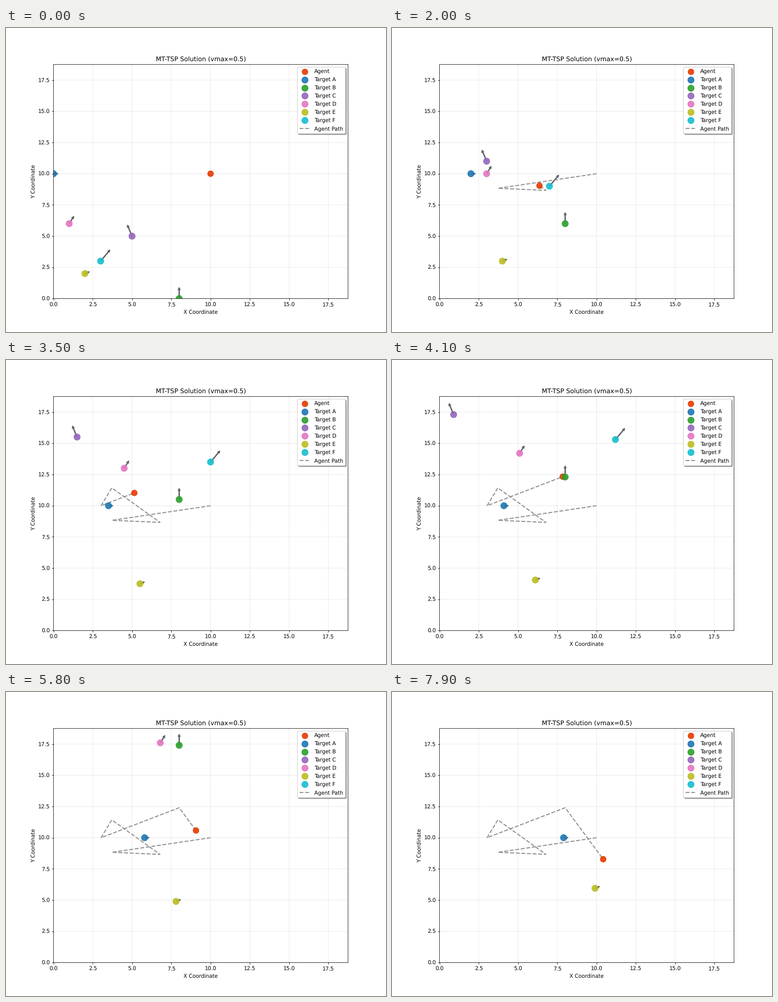
Recreate the animation shown at these times as a matplotlib script. Size 837 by 669 pixels, loop 8 s.

```python
import numpy as np
import matplotlib.pyplot as plt
from matplotlib.animation import FuncAnimation

# Soft, sub-pixel drawing of lines and text
plt.rcParams.update({"path.snap": False, "text.hinting": "none"})

FRAMES, STEP_MS = 80, 100
VMAX = 0.5
LIMIT = 18.75
ARROW_SCALE = 3
AGENT_COLOR, AGENT_SIZE, TARGET_SIZE = "#e63900", 11, 12

# name: (start, velocity per step, colour)
TARGETS = {
    "A": ((0, 10), (0.1, 0), "tab:blue"),
    "B": ((8, 0), (0, 0.3), "tab:green"),
    "C": ((5, 5), (-0.1, 0.3), "tab:purple"),
    "D": ((1, 6), (0.1, 0.2), "tab:pink"),
    "E": ((2, 2), (0.1, 0.05), "tab:olive"),
    "F": ((3, 3), (0.2, 0.3), "tab:cyan"),
}
START = np.array([10.0, 10.0])
TOUR = "CFDAB"
FINAL, FINAL_TIME = "E", 93.6

names = list(TARGETS)
starts = np.array([s for s, _, _ in TARGETS.values()], float)
vels = np.array([v for _, v, _ in TARGETS.values()])
colors = [c for _, _, c in TARGETS.values()]


def target_pos(name, t):
    i = names.index(name)
    return starts[i] + vels[i] * t


def intercept_time(pos, t, name):
    """Earliest time an agent at full speed can meet the target."""
    gap = target_pos(name, t) - pos
    vel = vels[names.index(name)]
    a = VMAX**2 - vel @ vel
    b = gap @ vel
    return t + (b + np.sqrt(b * b + a * (gap @ gap))) / a


def plan_route():
    times, points = [0.0], [START]
    for name in TOUR:
        times.append(intercept_time(points[-1], times[-1], name))
        points.append(target_pos(name, times[-1]))
    times.append(FINAL_TIME)
    points.append(target_pos(FINAL, FINAL_TIME))
    return np.array(times), np.array(points)


times, points = plan_route()

fig, ax = plt.subplots(figsize=(10.0001, 7.993), dpi=83.7)
ax.set(xlim=(0, LIMIT), ylim=(0, LIMIT),
       xlabel="X Coordinate", ylabel="Y Coordinate",
       title=f"MT-TSP Solution (vmax={VMAX})")
ax.grid(True, alpha=0.3)


def legend_dot(color, size, label):
    ax.plot([], [], "o", color=color, ms=size, alpha=0.9, label=label)


legend_dot(AGENT_COLOR, AGENT_SIZE, "Agent")
for name, color in zip(names, colors):
    legend_dot(color, TARGET_SIZE, f"Target {name}")
path, = ax.plot([], [], "--", color="gray", lw=2, alpha=0.85, zorder=1.5,
                label="Agent Path")

dots = ax.scatter(*np.vstack([START, starts]).T, c=[AGENT_COLOR, *colors],
                  s=[AGENT_SIZE**2] + [TARGET_SIZE**2] * len(names),
                  linewidths=1, alpha=0.9, zorder=2)
arrows = ax.quiver(*starts.T, *(ARROW_SCALE * vels).T, angles="xy",
                   scale_units="xy", scale=1, facecolor="#5c6368",
                   edgecolor="#5c6368", linewidth=1, joinstyle="miter",
                   width=0.0027, headwidth=3.1, headlength=3.1,
                   headaxislength=3.1, zorder=1)
ax.legend(loc="upper right", fancybox=True, shadow=True, labelspacing=0.54)


def update(t):
    pos = np.array([np.interp(t, times, points[:, i]) for i in (0, 1)])
    trail = np.vstack([points[times < t], pos])
    path.set_data(trail[:, 0], trail[:, 1])
    now = starts + vels * t
    dots.set_offsets(np.vstack([pos, now]))
    arrows.set_offsets(now)
    return path, dots, arrows


anim = FuncAnimation(fig, update, frames=FRAMES, interval=STEP_MS,
                     repeat=True, repeat_delay=0)
plt.show()
```
